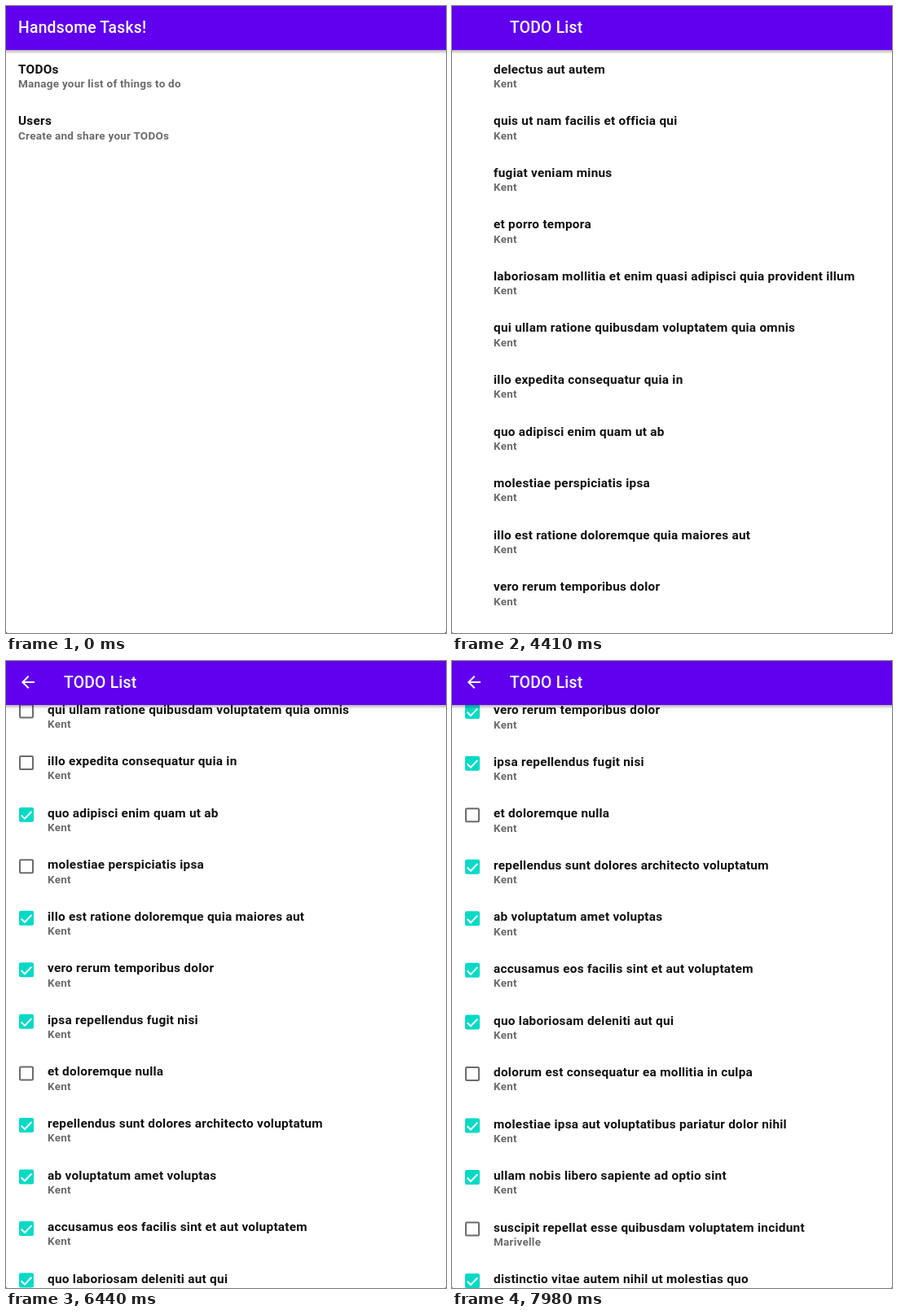
Write an HTML page that moves like this. It is 540 px wide and 770 px high and loops after 8000 ms.

```html
<!DOCTYPE html>
<html lang="en">
<head>
<meta charset="utf-8">
<title>Task list</title>
<style>
  html, body { margin: 0; width: 100%; height: 100%; overflow: hidden; background: #777; }
  svg { display: block; width: 540px; height: 770px; background: #fff; border-radius: 0 0 3px 3px;
        font-family: Roboto, sans-serif; letter-spacing: .24px; }
  .bar { font-size: 19.3px; font-weight: 500; fill: #fff; }
  .title { font-size: 15.4px; font-weight: 700; fill: #111; }
  .sub { font-size: 13.5px; font-weight: 700; fill: #6b6b6b; }
</style>
</head>
<body>
<svg viewBox="0 0 540 770">
  <defs>
    <linearGradient id="shade" x2="0" y2="1">
      <stop stop-color="#000" stop-opacity=".3"/>
      <stop offset="1" stop-color="#000" stop-opacity="0"/>
    </linearGradient>
    <clipPath id="firstRow"><rect y="54" width="540" height="64"/></clipPath>
    <rect id="off" x="-8" y="-8" width="16" height="16" rx="1.2" fill="none" stroke="#6b6b6b" stroke-width="2"/>
    <g id="on">
      <rect x="-9" y="-9" width="18" height="18" rx="2" fill="#03dac5"/>
      <path d="M-6.3 .7 L-2 5 L6.3 -3.7" fill="none" stroke="#fff" stroke-width="2"/>
    </g>
  </defs>
  <g id="home">
    <circle id="ripple" cx="138" cy="86" fill="#e4e4e4" clip-path="url(#firstRow)"/>
  </g>
  <g id="list">
    <rect y="54" width="540" height="716" fill="#fff"/>
    <g id="rows"></g>
  </g>
  <rect y="54" width="540" height="5" fill="url(#shade)"/>
  <rect width="540" height="54" fill="#6000ee"/>
  <text id="homeTitle" class="bar" x="15" y="33">Handsome Tasks!</text>
  <text id="listTitle" class="bar" x="71" y="33">TODO List</text>
  <path id="back" transform="translate(27 26)" fill="#fff"
        d="M8 -1H-4.17L1.42 -6.59L0 -8L-8 0L0 8L1.41 6.59L-4.17 1H8z"/>
</svg>
<script>
const LOOP = 8000, STEP = 70, PITCH = 63.55;
const $ = id => document.getElementById(id);

// A leading "+" marks a finished task.
const tasks = `delectus aut autem
quis ut nam facilis et officia qui
fugiat veniam minus
+et porro tempora
laboriosam mollitia et enim quasi adipisci quia provident illum
qui ullam ratione quibusdam voluptatem quia omnis
illo expedita consequatur quia in
+quo adipisci enim quam ut ab
molestiae perspiciatis ipsa
+illo est ratione doloremque quia maiores aut
+vero rerum temporibus dolor
+ipsa repellendus fugit nisi
et doloremque nulla
+repellendus sunt dolores architecto voluptatum
+ab voluptatum amet voluptas
+accusamus eos facilis sint et aut voluptatem
+quo laboriosam deleniti aut qui
dolorum est consequatur ea mollitia in culpa
+molestiae ipsa aut voluptatibus pariatur dolor nihil
+ullam nobis libero sapiente ad optio sint
suscipit repellat esse quibusdam voluptatem incidunt
+distinctio vitae autem nihil ut molestias quo`.split("\n");

function row(x, index, title, sub) {
  const y = index * PITCH;
  return `<text class="title" x="${x}" y="${82.7 + y}">${title}</text>
          <text class="sub" x="${x}" y="${100 + y}">${sub}</text>`;
}

function box(index, done) {
  return `<use class="box" href="#${done ? "on" : "off"}" x="25" y="${79.6 + index * PITCH}"/>`;
}

$("home").insertAdjacentHTML("beforeend",
  row(15, 0, "TODOs", "Manage your list of things to do") +
  row(15, 1, "Users", "Create and share your TODOs"));

$("rows").innerHTML = tasks.map((task, i) =>
  row(51, i, task.replace("+", ""), i < 20 ? "Kent" : "Marivelle") + box(i, task[0] === "+")).join("");

const icons = [$("back"), ...document.querySelectorAll(".box")];

// [time, value] pairs
const scrollKeys = [[5740, 0], [5810, 10], [5880, 36], [5950, 72.7], [6020, 128], [6090, 184],
  [6160, 231], [6230, 269], [6300, 298], [6370, 320], [6440, 335.8], [6510, 345], [6580, 350],
  [6650, 357], [6720, 375], [6790, 404], [6860, 438], [6930, 475], [7000, 512], [7070, 543],
  [7140, 567], [7210, 586], [7280, 600], [7350, 609], [7420, 614], [7840, 614], [7910, 627], [7980, 653]];
const rippleKeys = [[3360, 0], [3430, 112], [3500, 260], [3570, 420]];
const rippleFade = [[3500, 1], [3640, 0]];
const screenFade = [[4270, 0], [4340, .6], [4410, 1]];
const iconFade = [[4830, 0], [5110, 1]];

function at(keys, t) {
  const next = keys.findIndex(key => key[0] > t);
  if (next === 0) return keys[0][1];
  if (next < 0) return keys[keys.length - 1][1];
  const [t0, a] = keys[next - 1], [t1, b] = keys[next];
  return a + (b - a) * (t - t0) / (t1 - t0);
}

function draw(time) {
  const t = Math.floor(time % LOOP / STEP) * STEP;
  const shown = at(screenFade, t), iconAlpha = at(iconFade, t);
  $("ripple").setAttribute("r", at(rippleKeys, t));
  $("ripple").setAttribute("opacity", at(rippleFade, t));
  $("list").setAttribute("opacity", shown);
  $("listTitle").setAttribute("opacity", shown);
  $("homeTitle").setAttribute("opacity", 1 - shown);
  $("rows").setAttribute("transform", `translate(0 ${-at(scrollKeys, t)})`);
  icons.forEach(icon => icon.setAttribute("opacity", iconAlpha));
}

const start = performance.now();
function tick() {
  draw(performance.now() - start);
  requestAnimationFrame(tick);
}
tick();
</script>
</body>
</html>
```
